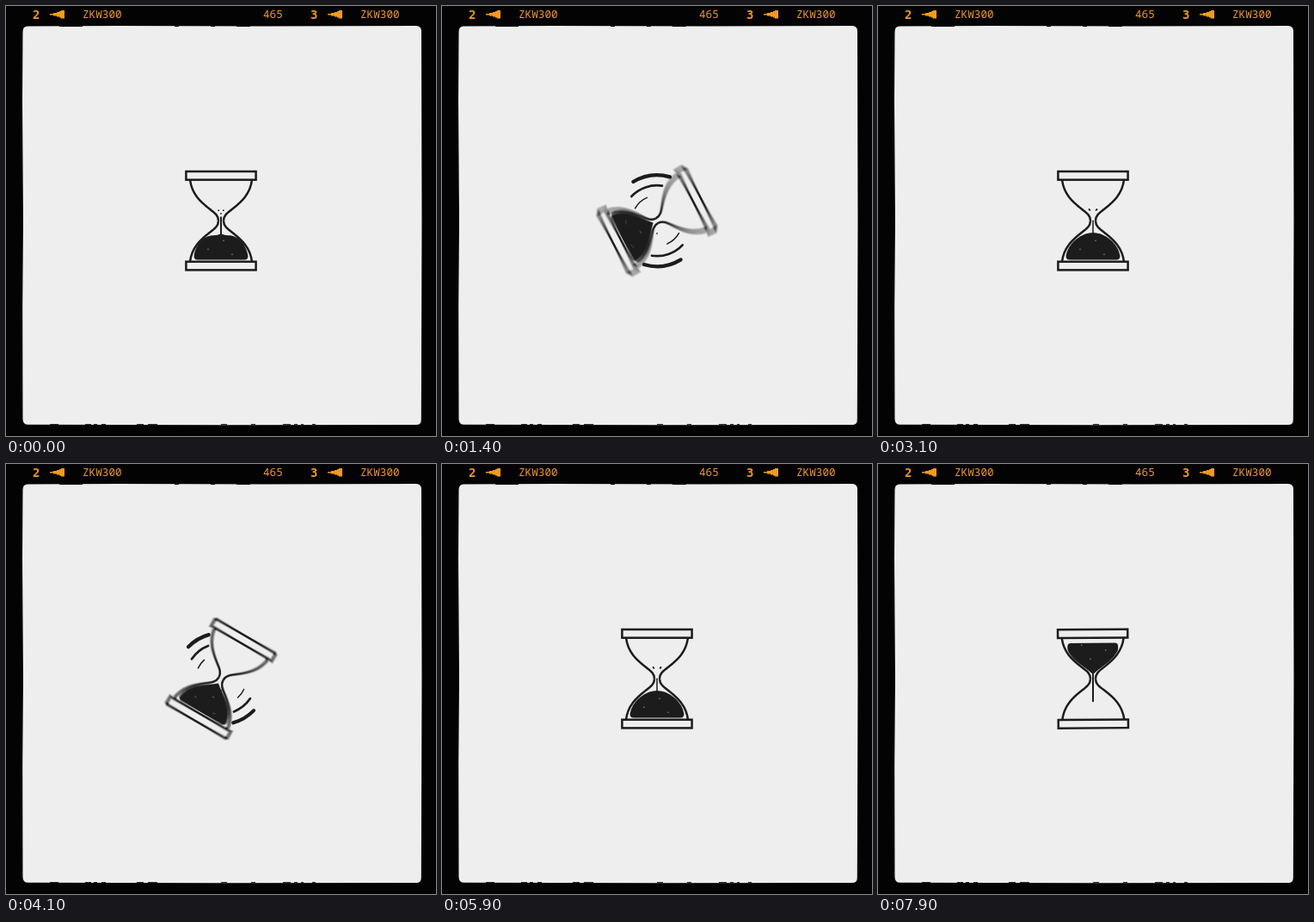
An HTML page that plays this animation: 500x499 px, repeating every 8000 ms.

```html
<!DOCTYPE html>
<html lang="en">
<head>
<meta charset="utf-8">
<title>Hourglass</title>
<style>
  html, body { margin: 0; width: 100%; height: 100%; overflow: hidden; background: #030303; }
  svg { display: block; width: 100vw; height: 100vh; }
  .label { font: 500 12.7px "Noto Sans Mono", monospace; fill: #f29a1c; }
  .num { font: 700 14px "DejaVu Sans Mono", monospace; }
  .line { fill: none; stroke: #1c1c1c; stroke-width: 2.5; }
  .ink { fill: #1c1c1c; }
  .trail { fill: none; stroke: #1c1c1c; stroke-linecap: round; }
</style>
</head>
<body>
<svg viewBox="0 0 500 499" preserveAspectRatio="none">
  <defs>
    <path id="arrow" fill="#f29a1c" d="M51 9h4v-1h4v-1h3v-1h2v-1h4v9.500h-4v-1h-2v-1h-3v-1h-4v-1h-4z"/>
    <clipPath id="level"><rect id="levelRect"/></clipPath>
    <g id="specks" fill="#8a8a8a">
      <circle cx="3" cy="23" r=".8"/><circle cx="-15" cy="33" r=".8"/><circle cx="13" cy="39" r=".8"/>
    </g>
    <g id="half">
      <rect class="line" x="-40.600" y="-57.200" width="81.200" height="9.700"/>
      <path class="line" d="M-36-47.500C-34-31-24-22-13-13.500C-7-9-3-6-3 0M36-47.500C34-31 24-22 13-13.500C7-9 3-6 3 0"/>
    </g>
    <g id="glass">
      <circle r="82" fill="#eee"/>
      <g clip-path="url(#level)">
        <path id="sand" class="ink"/>
        <use href="#specks"/>
      </g>
      <g id="pile">
        <path id="pileShape" class="ink"/>
        <use href="#specks"/>
      </g>
      <use href="#half"/>
      <use href="#half" transform="rotate(180)"/>
    </g>
  </defs>

  <rect width="500" height="499" fill="#030303"/>
  <path fill="#eee" d="M25 23.500L130 23L300 23.500L477 23Q483 23.500 483 29L483.500 250L482.800 480Q483 486 477 486L250 486.300L26 485.800Q19.500 486 19.500 479L19.200 350L20 250L19 110L19.500 30Q19.500 23.500 25 23.500Z"/>
  <path stroke="#030303" fill="none" d="M51 485.700h10M92 485.700h7m3 0h4m5 0h5M152 485.700h8m5 0h11M250 485.700h7M285 485.700h5M322 485.700h9m4 0h4m4 0h3m10 0h4M62 23.500h27M196 23.500h5M238 23.500h5M268 23.500h16"/>

  <text class="label num" x="31" y="14.500">2</text>
  <use href="#arrow"/>
  <text class="label" x="89" y="14.300">ZKW300</text>
  <text class="label" x="299" y="14.300">465</text>
  <text class="label num" x="354" y="14.500">3</text>
  <use href="#arrow" x="323"/>
  <text class="label" x="412" y="14.300">ZKW300</text>

  <g id="scene" transform="translate(250 249.200)">
    <g id="blur"></g>
    <g id="trails"></g>
    <path id="stream" class="trail"/>
    <path id="grains" class="trail" stroke-width="1.800"/>
  </g>
</svg>
<script>
const LOOP = 8000, CYCLE = 2800, SAMPLES = 9, SHUTTER = 18;
const $ = id => document.getElementById(id);
const clamp = v => Math.max(0, Math.min(1, v));
const span = (t, a, b) => clamp((t - a) / (b - a));
const mix = (a, b, k) => a + (b - a) * k;
const set = (el, attrs) => { for (const k in attrs) el.setAttribute(k, attrs[k]); };
const show = (el, on) => { el.style.display = on ? '' : 'none'; };
const make = (tag, parent, attrs) => {
  const el = document.createElementNS('http://www.w3.org/2000/svg', tag);
  set(el, attrs);
  return parent.appendChild(el);
};

// Opaque copies weighted 1/n give an even average of the poses.
const copies = Array.from({ length: SAMPLES }, (_, i) =>
  make('use', $('blur'), { href: '#glass', opacity: 1 / (i + 1) }));

// Radius, stroke width, arc length, lag behind the axis at rest and at speed (degrees).
const trails = [[53, 4.2, 48, 45, 46], [41, 2.7, 55, 47, 54], [29.3, 1.5, 37, 48, 86]]
  .flatMap(([r, width, arc, lag, fastLag]) => [0, 180].map(side => ({
    r, arc, lag, fastLag, side,
    el: make('path', $('trails'), { class: 'trail', 'stroke-width': width })
  })));

// Turn with cubic-bezier(.536, 0, .136, 1)
function turn(t) {
  const x = span(t, 900, 2400);
  let lo = 0, hi = 1;
  for (let i = 0; i < 24; i++) {
    const s = (lo + hi) / 2, q = 1 - s;
    if (3 * .536 * s * q * q + 3 * .136 * s * s * q + s * s * s < x) lo = s; else hi = s;
  }
  return 180 * lo * lo * (3 - 2 * lo);
}

// peak: flat mound to round dome; cone: dome to a funnel reaching the neck
function sandPath(peak, cone) {
  const sy = mix(mix(17, 15.4, peak), 12.5, cone);
  const qy = mix(mix(16.8, 13.8, peak), 9, cone);
  const top = mix(mix(15, 13.8, peak), 5, cone);
  const cx = mix(mix(20, 17, peak), 19, cone), cy = mix(mix(17, 18.5, peak), 20, cone);
  return `M-27 45.300Q-32 45.300-31.300 40C-29 27 ${-cx} ${cy}-9 ${sy}Q-4 ${qy} 0 ${top}` +
    `Q4 ${qy} 9 ${sy}C${cx} ${cy} 29 27 31.300 40Q32 45.300 27 45.300Z`;
}

function point(r, deg) {
  const a = deg * Math.PI / 180;
  return `${(r * Math.sin(a)).toFixed(2)} ${(-r * Math.cos(a)).toFixed(2)}`;
}

function drawSand(p) {
  set($('sand'), { d: sandPath(span(p, 0, 300), span(p, 950, 1350)) });
  const drain = span(p, 1950, 2800);
  const depth = drain ? 5 + 40 * (1 - .9 * drain ** 2.6) : 46;
  const half = drain ? 31.5 * clamp((depth - 4) / 41) ** .75 : 40;
  set($('levelRect'), { x: -half, width: 2 * half, y: 0, height: depth, rx: drain ? Math.min(4, half) : 0 });

  const grow = span(p, 2350, 2800);
  show($('pile'), grow > 0);
  set($('pileShape'), { d: sandPath(0, 0) });
  const sx = mix(.35, 1, clamp(grow * 1.5)), sy = grow ** .8;
  set($('pile'), { transform: `rotate(180) translate(0 45.300) scale(${sx} ${sy}) translate(0 -45.300)` });
}

function drawStream(p) {
  const pouring = p > 2130;
  const grow = span(p, 2350, 2800);
  let top, bottom;
  if (pouring) {
    top = -5;
    bottom = Math.min(mix(-5, 26, span(p, 2130, 2300)) + Math.max(0, p - 2300) * .2, 45 - 30 * grow ** .8);
  } else {
    top = -4 + p / 75;
    bottom = 15;
  }
  show($('stream'), pouring || top < bottom);
  set($('stream'), { d: `M0 ${top}V${bottom}`, 'stroke-width': pouring ? 2 : mix(2, 1.5, span(p, 0, 300)) });

  // The last grains hop up, then slide down the walls into the neck.
  show($('grains'), p < 430);
  const k = p / 300;
  const x = 2.8 + 1.7 * k + 5 * Math.max(0, k * (1 - k));
  const y = -12 - 1.2 * k - 28 * k * (1 - k);
  const tail = k * .9;
  set($('grains'), {
    d: `M${-x} ${y}l${tail} ${tail}M${x} ${y}l${-tail} ${tail}` + (p < 100 ? 'M0-8.300h.01' : '')
  });
}

function render(t) {
  const p = t % CYCLE;
  const speed = turn(p + 50) - turn(p - 50);
  drawSand(p);
  drawStream(p);
  copies.forEach((el, i) => {
    const offset = SHUTTER * (i / (SAMPLES - 1) - .5);
    show(el, i === 0 || speed > 8.5);
    set(el, { transform: `rotate(${turn(p + (speed > 8.5 ? offset : 0))})` });
  });

  const pace = clamp((speed - 6) / 28);
  show($('trails'), speed > 5.5);
  for (const { r, arc, lag, fastLag, side, el } of trails) {
    const head = turn(p) - mix(lag, fastLag, pace) + side;
    const tail = head - Math.max(.5, arc * pace);
    set(el, { d: `M${point(r, tail)}A${r} ${r} 0 0 1 ${point(r, head)}` });
  }
}

const start = performance.now();
function tick() {
  // Poses hold for a tenth of a second each.
  const t = (performance.now() - start) % LOOP;
  render(Math.floor(t / 100) * 100);
  requestAnimationFrame(tick);
}
tick();
</script>
</body>
</html>
```
